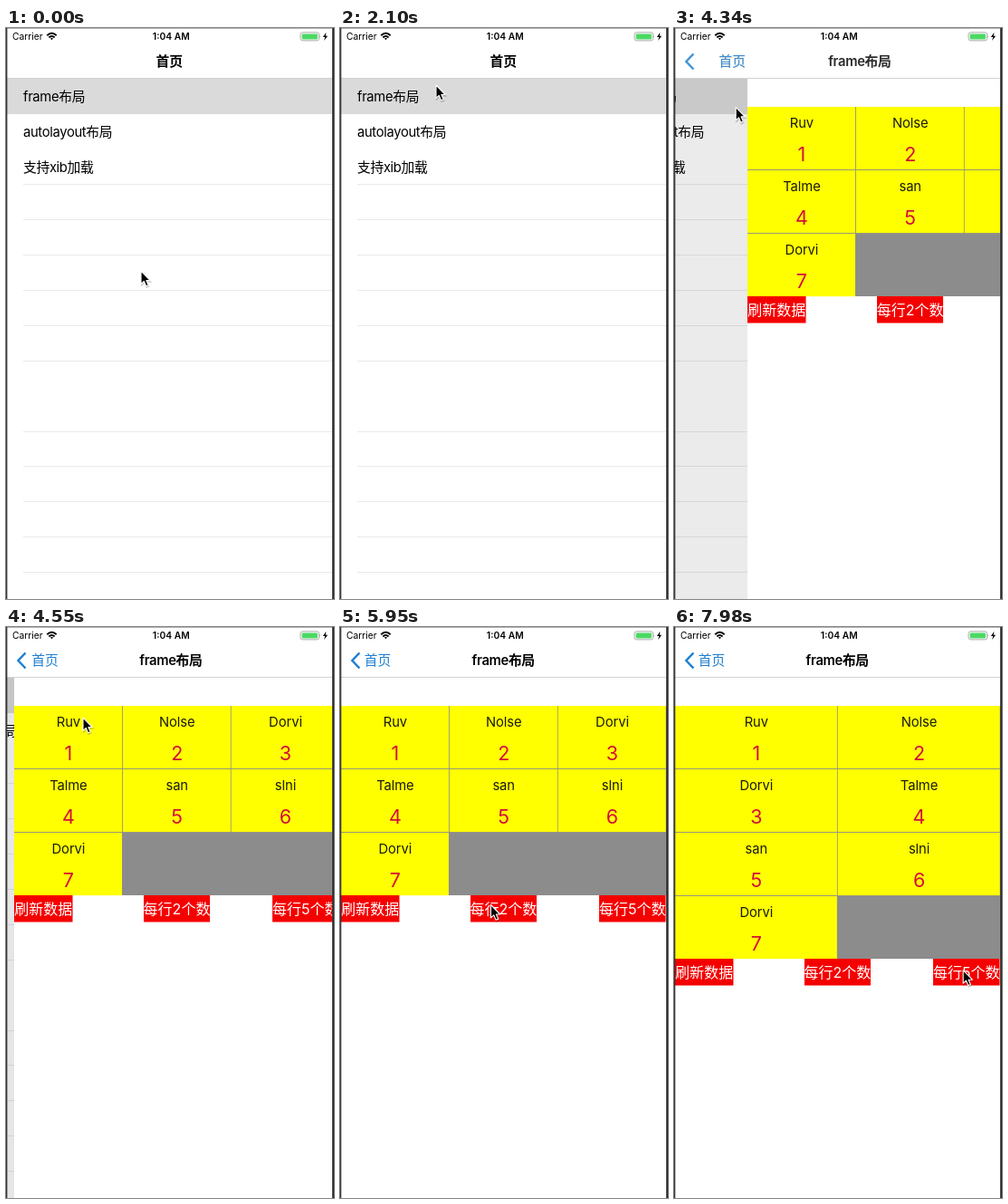
Animation of 362x630 px, one loop 8 s. Source, as an HTML page:

```html
<!DOCTYPE html>
<html lang="zh-Hans">
<head>
<meta charset="utf-8">
<title>frame布局</title>
<style>
  html, body { margin: 0; width: 100%; height: 100%; overflow: hidden; background: #fff; }
  svg { display: block; width: 362px; height: 630px; }
  text { font: 14.8px Inter, "Noto Sans CJK SC", "Noto Sans CJK", sans-serif; fill: #000; }
  .mid { text-anchor: middle; }
  .bold { font-weight: 600; }
  .latin { letter-spacing: -.35px; }
  .status { font-size: 10.3px; }
  .blue { fill: #1e7fd2; }
  .name { fill: #1a1a10; letter-spacing: -.1px; }
  .num { font-size: 21.5px; fill: #d3103c; }
  .btn { font-size: 16px; fill: #fff; }
</style>
</head>
<body>
<svg viewBox="0 0 362 630">
  <rect width="362" height="630" fill="#fff"/>
  <g id="list"></g>
  <rect id="dim" y="56" width="362" height="574" opacity="0"/>
  <g id="page">
    <rect x="1" y="56" width="361" height="574" fill="#fff"/>
    <g id="grid3"></g>
    <g id="grid2"></g>
  </g>

  <rect width="362" height="56" fill="#fff"/>
  <rect y="55" width="362" height="1" fill="#d2d2d2"/>
  <text id="home" class="mid bold" y="42">首页</text>
  <text id="back" class="mid blue" y="42">首页</text>
  <path id="chevron" d="M21.5 28.5 13.5 37l8 8.5" fill="none" stroke="#1e7fd2" stroke-width="2.5"/>
  <text id="title" class="mid bold latin" y="42">frame布局</text>

  <text class="status" x="7" y="13.2">Carrier</text>
  <g fill="none" stroke="#000" stroke-width="1.9">
    <path d="M45.3 8.3Q50.5 3.4 55.7 8.3M47.4 10.5Q50.5 7.6 53.6 10.5"/>
    <path d="M48.9 11.6Q50.5 10.2 52.1 11.6L50.5 13.3Z" fill="#000" stroke="none"/>
  </g>
  <text class="status mid bold" x="182.3" y="13.2">1:04 AM</text>
  <rect x="325" y="4.9" width="20.5" height="9" rx="2.3" fill="#fff" stroke="#a0a0a0" stroke-width=".9"/>
  <rect x="326.6" y="6.4" width="17.3" height="6" rx="1" fill="#4cd964"/>
  <path d="M346.6 8v3q1.5-1.5 0-3" fill="#a0a0a0"/>
  <path d="M353.4 4.8 349.8 10h2.3l-1 4 3.9-5.3h-2.4z"/>

  <rect width="362" height=".7" fill="#8a8a8a"/>
  <rect width="1.4" height="630" fill="#333"/>
  <rect x="360" width="2" height="630" fill="#333"/>

  <g id="ring" fill="none">
    <circle r="21.2" stroke="#fff" stroke-opacity=".8" stroke-width="3.6"/>
    <circle r="21.2" stroke="#000" stroke-width="1.5"/>
  </g>
  <g id="cursor">
    <path d="M0 0V14.4L3.3 11.4 5.6 16.8 8.2 15.7 5.9 10.5H10.2Z" transform="translate(.5 1.5)" opacity=".18" stroke="#000" stroke-width="1.5"/>
    <path d="M0 0V14.4L3.3 11.4 5.6 16.8 8.2 15.7 5.9 10.5H10.2Z" stroke="#fff" stroke-width="1.1" stroke-linejoin="round"/>
  </g>
</svg>
<script>
const LOOP = 8000, STEP = 70;
const PUSH = 4130, PUSH_END = 4830, REGRID = 7070;
const el = id => document.getElementById(id);
const rect = (x, y, w, h, fill) =>
  `<rect x="${x}" y="${y}" width="${w}" height="${h}" fill="${fill}"/>`;
const text = (cls, x, y, s) => `<text class="${cls}" x="${x}" y="${y}">${s}</text>`;

function listView() {
  let out = rect(1, 56, 361, 39, '#dadada');
  ['frame布局', 'autolayout布局', '支持xib加载'].forEach((s, i) => {
    out += text('latin', 19, 80.7 + 39 * i, s);
  });
  for (let i = 0; i < 12; i++) {
    if (i !== 6) out += rect(19, 172 + Math.round(38.93 * i), 343, 1, '#e9e9e9');
  }
  return out;
}

function gridView(cols) {
  const names = ['Ruv', 'Nolse', 'Dorvi', 'Talme', 'san', 'slni', 'Dorvi'];
  const rows = Math.ceil(names.length / cols), w = 359.4 / cols, h = 70;
  const bottom = 87 + rows * h - 1;
  let out = rect(1, 87, 359, rows * h - 1, '#8c8c8c');
  names.forEach((s, i) => {
    const x = 1 + i % cols * w, y = 87 + Math.floor(i / cols) * h;
    out += rect(x, y, w - .8, h - .9, '#ff0')
      + text('mid name', x + w / 2, y + 23, s)
      + text('mid num', x + w / 2, y + 60, i + 1);
  });
  [['刷新数据', 1, 64.5], ['每行2个数', 144, 73], ['每行5个数', 286, 73.5]].forEach(([s, x, bw]) => {
    out += rect(x, bottom, bw, 29.5, '#f50000') + text('mid btn', x + bw / 2, bottom + 20.8, s);
  });
  return out;
}

// Pointer path: time, x, y
const path = [
  [0, 149, 268], [140, 89, 170], [210, 200, 70], [280, 342, 18], [350, 331, 14],
  [420, 331, 14], [560, 240, 70], [630, 150, 137], [700, 88, 105], [770, 75, 62],
  [1400, 75, 62], [1610, 5, 90], [1820, 45, 50], [2100, 106, 63], [2240, 97, 82],
  [2450, 38, 80], [3010, 38, 80], [3290, 55, 79], [3430, 55, 79], [3500, 57, 79],
  [4200, 57, 79], [4550, 85, 100], [5180, 129, 192], [5600, 164, 303], [6300, 169, 310],
  [7070, 169, 310], [7350, 196, 331], [7770, 310, 376], [LOOP, 320, 379]
];

function pointer(t) {
  const i = Math.max(1, path.findIndex(p => p[0] >= t));
  const [t0, x0, y0] = path[i - 1], [t1, x1, y1] = path[i];
  const k = (t - t0) / (t1 - t0);
  return [x0 + (x1 - x0) * k, y0 + (y1 - y0) * k];
}

// Critically damped spring, remaining distance 1 -> 0
function rest(t, rate) {
  if (t <= PUSH) return 1;
  if (t > PUSH_END) return 0;
  const x = rate * (t - PUSH) / 1000;
  return (1 + x) * Math.exp(-x);
}

const move = (id, x, y = 0) => el(id).setAttribute('transform', `translate(${x} ${y})`);
const fade = (id, a) => el(id).setAttribute('opacity', a);
const show = (id, on) => el(id).setAttribute('visibility', on ? 'visible' : 'hidden');

function draw(t) {
  const r = rest(t, 13.6), n = rest(t, 15.5);
  move('page', 361 * r);
  move('list', -108 * (1 - r));
  fade('dim', .1 * (1 - r));

  const x = 41.5 + 138.7 * n;
  el('home').setAttribute('x', x);
  el('back').setAttribute('x', x);
  el('title').setAttribute('x', 180.2 + 150 * n);
  fade('home', n);
  ['back', 'chevron', 'title'].forEach(id => fade(id, 1 - n));

  show('grid3', t < REGRID);
  show('grid2', t >= REGRID);

  const [px, py] = pointer(t);
  move('cursor', px, py);
  move('ring', px, py + 1);
  show('ring', t >= 4060 && t < 4200 || t >= 6860 && t < 7000);
}

el('list').innerHTML = listView();
el('grid3').innerHTML = gridView(3);
el('grid2').innerHTML = gridView(2);

const start = performance.now();
function tick() {
  const t = (performance.now() - start) % LOOP;
  draw(Math.floor(t / STEP) * STEP);
  requestAnimationFrame(tick);
}
tick();
</script>
</body>
</html>
```
